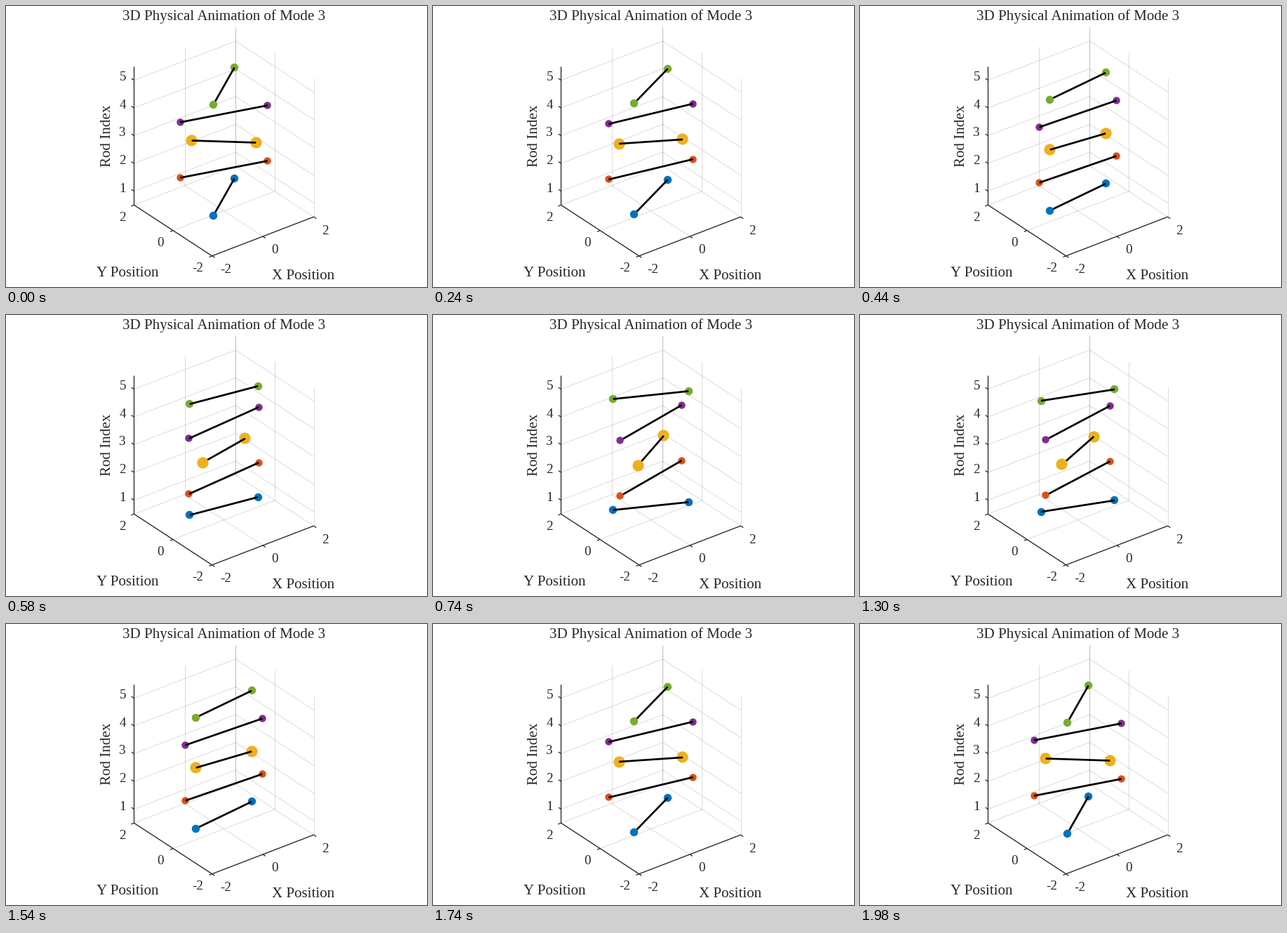
These frames come from a looping animation (600 px wide and 400 px high, 2 s). A matplotlib script:

```python
import numpy as np
import matplotlib.pyplot as plt
from matplotlib.animation import FuncAnimation
from matplotlib.patches import Circle

W, H, DPI = 600, 400, 100
FRAMES, INTERVAL = 100, 20
PT = 72 / DPI
INK = "#262626"

# Orthographic view
AZ, EL = np.radians(37.5), np.radians(30)
SCALE, Z_SCALE = 45.65, 39.5
CENTER = np.array([310.5, 291.75])
X_DIR = SCALE * np.array([np.cos(AZ), -np.sin(AZ) * np.sin(EL)])
Y_DIR = SCALE * np.array([-np.sin(AZ), -np.cos(AZ) * np.sin(EL)])
LO, HI, Z_LO, Z_HI = -2, 2, 0.5, 5.5

# color, half length, swing in degrees, marker radius
RODS = [
    ("#0072BD", 1.203, 36.65, 5.7),
    ("#D95319", 1.463, -16.4, 5.2),
    ("#EDB120", 1.005, -41.2, 8.1),
    ("#7E2F8E", 1.463, -16.4, 5.2),
    ("#77AC30", 1.203, 36.65, 5.7),
]
STEEP = 0.018  # depth per pixel at which the near marker hides the rod

fig = plt.figure(figsize=(W / DPI, H / DPI), dpi=DPI, facecolor="white")
ax = fig.add_axes([0, 0, 1, 1])
ax.set_xlim(0, W)
ax.set_ylim(H, 0)
ax.axis("off")


def project(x, y, z):
    return CENTER + x * X_DIR + y * Y_DIR - [0, (z - Z_LO) * Z_SCALE]


def segment(p, q, color=INK, width=1.0, **kw):
    return ax.plot([p[0], q[0]], [p[1], q[1]], color=color, lw=width * PT,
                   solid_capstyle="butt", **kw)[0]


def edge(a, b, **kw):
    return segment(project(*a), project(*b), **kw)


def tick(point, direction, length=4.5):
    p = project(*point)
    segment(p, p + length * direction / np.hypot(*direction), width=1.25, zorder=2)


def label(x, y, text, size, **kw):
    kw = {"ha": "center", "va": "baseline", **kw}
    ax.text(x, y, text, fontsize=size * PT, family="Liberation Serif",
            color=INK, **kw)


def draw_box():
    grid = dict(color=INK, alpha=0.15, width=1.1, zorder=1)
    for v in (LO, 0, HI):
        edge((v, LO, Z_LO), (v, HI, Z_LO), **grid)
        edge((LO, v, Z_LO), (HI, v, Z_LO), **grid)
        edge((v, HI, Z_LO), (v, HI, Z_HI), **grid)
        edge((HI, v, Z_LO), (HI, v, Z_HI), **grid)
        tick((v, LO, Z_LO), -Y_DIR)
        tick((LO, v, Z_LO), -X_DIR)
    for z in range(1, 6):
        edge((LO, HI, z), (HI, HI, z), **grid)
        edge((HI, HI, z), (HI, LO, z), **grid)
        tick((LO, HI, z), Y_DIR)
        label(171, 304.2 - z * 39.6, str(z), 19, ha="right")
    corner = (LO, HI, Z_LO)
    front = (LO, LO, Z_LO)
    for a, b in ((corner, (LO, HI, Z_HI)), (corner, front), (front, (HI, LO, Z_LO))):
        edge(a, b, width=1.3, zorder=2)


def draw_text():
    label(311, 20, "3D Physical Animation of Mode 3", 21)
    label(173, 385, "Y Position", 21)
    label(423.5, 389, "X Position", 21)
    label(149, 185, "Rod Index", 21, rotation=90, rotation_mode="anchor")
    for x, y, text in ((165.5, 306, "2"), (220.5, 342, "0"), (273, 378, "-2"),
                       (313, 380, "-2"), (383, 352, "0"), (455, 325, "2")):
        label(x, y, text, 19)


class Rod:
    def __init__(self, z, color, half, swing, radius):
        self.z, self.half, self.swing = z, half, np.radians(swing)
        self.line = segment((0, 0), (0, 0), color="black", width=2.7, zorder=4)
        self.near, self.far = (
            ax.add_patch(Circle((0, 0), radius, fc=color, ec="none", zorder=3))
            for _ in range(2))

    def pose(self, wave):
        angle = self.swing * wave
        x, y = self.half * np.cos(angle), self.half * np.sin(angle)
        p, q = project(-x, -y, self.z), project(x, y, self.z)
        self.line.set_data([p[0], q[0]], [p[1], q[1]])
        # markers sit on whole pixels
        self.near.center = np.floor(p) + 0.5
        self.far.center = np.floor(q) + 0.5
        slope = (x * np.sin(AZ) + y * np.cos(AZ)) / (np.hypot(*(q - p)) / 2)
        self.near.set_zorder(5 if slope > STEEP else 3)
        return self.line, self.near, self.far


draw_box()
draw_text()
rods = [Rod(i, *spec) for i, spec in enumerate(RODS, 1)]


def update(i):
    wave = np.cos(2 * np.pi * i / (FRAMES - 1))
    return [part for rod in rods for part in rod.pose(wave)]


anim = FuncAnimation(fig, update, frames=FRAMES, interval=INTERVAL,
                     repeat=True, repeat_delay=0, blit=False)
plt.show()
```
